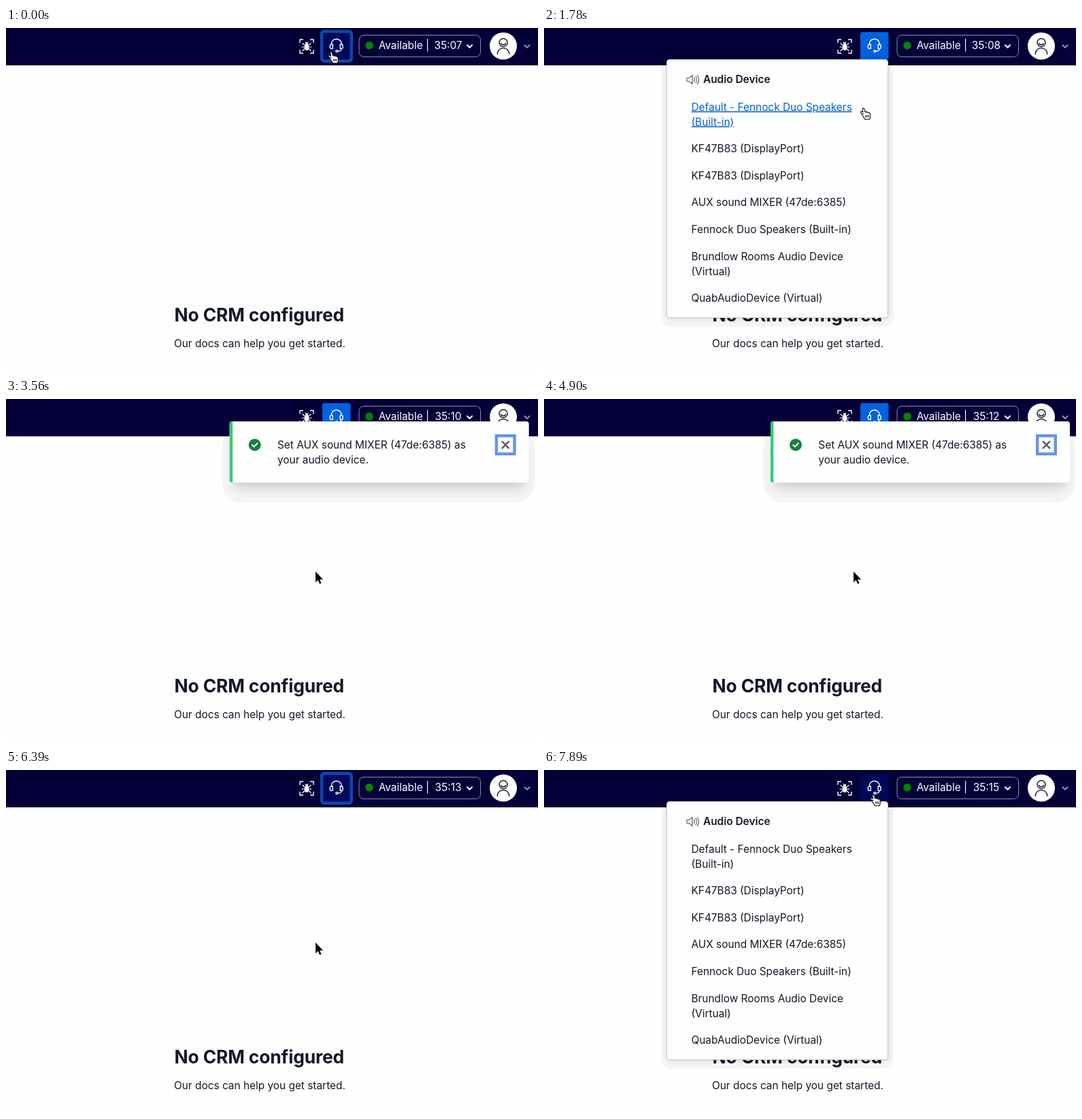
Recreate the animation shown at these times as an HTML page. Size 782x505 px, loop 8000 ms.

```html
<!DOCTYPE html>
<html lang="en">
<head>
<meta charset="utf-8">
<title>Audio device menu</title>
<style>
  html, body { margin: 0; width: 100%; height: 100%; overflow: hidden; background: #fefefe; }
  svg { display: block; width: 100%; height: 100%; }
  text { font: 15.4px Inter, "Liberation Sans", sans-serif; fill: #111827; white-space: pre; }
  .bold { font-weight: 600; }
  .title { font-size: 26.4px; font-weight: 700; letter-spacing: -.005em; }
  .light text { fill: #fff; }
  .line { fill: none; stroke-linecap: round; stroke-linejoin: round; }
  .hover text { fill: #0062e0; text-decoration: underline; }
</style>
</head>
<body>
<svg viewBox="0 0 782 505">
  <rect width="782" height="505" fill="#fefefe"/>
  <text class="title" x="247.5" y="431.5">No CRM configured</text>
  <text x="247" y="469.5">Our docs can help you get started.</text>

  <g class="light">
    <rect width="782" height="55" fill="#040038"/>

    <!-- bug report -->
    <g class="line" stroke="#fff" stroke-width="1.4">
      <path d="M432 22v-5h5M447 17h5v5M452 32v5h-5M437 37h-5v-5" stroke-linecap="butt"/>
      <path d="M439 25l-3-2.5M445 25l3-2.5M438.5 28H435M445.5 28h3.5M439 30.5l-3 3M445 30.5l3 3" stroke-width="1.2"/>
      <path d="M440 20.5l1 1.5M444 20.5l-1 1.5" stroke-width="1"/>
    </g>
    <ellipse cx="442" cy="28.3" rx="3.3" ry="4.8" fill="#fff"/>
    <circle cx="442" cy="23" r="2" fill="#fff"/>

    <!-- headset button -->
    <rect id="button" x="465" y="6" width="41.5" height="41" rx="3"/>
    <rect id="ring" x="464" y="5" width="43.8" height="43.8" rx="4" fill="none" stroke="#0a49b0" stroke-width="4.4"/>
    <g class="line" stroke="#fff" stroke-width="1.4">
      <path d="M478.3 24v-1a7.4 6.8 0 0 1 14.8 0v1"/>
      <path d="M480.2 24h-1.7a2.2 2.2 0 0 0-2.2 2.2v2a2.2 2.2 0 0 0 2.2 2.2h1.7z"/>
      <path d="M491.2 24h1.7a2.2 2.2 0 0 1 2.2 2.2v2a2.2 2.2 0 0 1-2.2 2.2h-1.7z"/>
      <path d="M493 30.5a4 4 0 0 1-4 3.6h-1.3"/>
      <circle cx="486.3" cy="34.1" r="1.5"/>
    </g>

    <!-- status -->
    <rect x="519" y="10.5" width="178.5" height="32" rx="7" fill="none" stroke="#8f8da8"/>
    <circle cx="534" cy="25.7" r="5.8" fill="#008500"/>
    <text x="547.7" y="31">Available |</text>
    <text id="clock" x="650" y="31" text-anchor="middle"></text>
    <path class="line" d="M678 25.3l3.5 3.5 3.5-3.5" stroke="#fff" stroke-width="2.2"/>

    <!-- account -->
    <circle cx="731" cy="26.5" r="20" fill="#fff"/>
    <g class="line" stroke="#222230" stroke-width="1.5">
      <circle cx="731" cy="21.5" r="6"/>
      <path d="M727.5 22.5a3.6 3 0 0 0 7 0M722.3 38.3a8.7 8.9 0 0 1 17.4 0"/>
    </g>
    <path class="line" d="M762.5 25.3l3.5 3.5 3.5-3.5" stroke="#8a89a5" stroke-width="2.2"/>
  </g>

  <g id="menu">
    <rect x="172.5" y="40" width="341.5" height="399.5" rx="14" opacity=".04"/>
    <rect x="180" y="48" width="326" height="380" rx="5" opacity=".12" style="filter:blur(3px)"/>
    <rect x="180.5" y="46.5" width="325" height="380" rx="4" fill="#fefefe" stroke="#c5c8d4"/>
    <g class="line" stroke="#5d6271" stroke-width="1.2">
      <path d="M210 73.5h3.5l4.5-4v13l-4.5-4h-3.5z"/>
      <path d="M220.5 73.5a4 4 0 0 1 0 5M223 71.5a7 7 0 0 1 0 9M225.3 69.6a10 10 0 0 1 0 12.8"/>
    </g>
    <text class="bold" x="234" y="81">Audio Device</text>
    <g id="items"></g>
  </g>

  <g id="toast">
    <rect x="322" y="40" width="459" height="113" rx="30" opacity=".03"/>
    <rect x="338.5" y="58" width="429" height="76" rx="4" opacity=".11" style="filter:blur(10px)"/>
    <rect x="338.5" y="49.5" width="429" height="79" rx="4" opacity=".05" style="filter:blur(5.5px)"/>
    <rect x="333" y="33" width="440" height="90" rx="4" fill="#fefefe"/>
    <path d="M337.4 33v90h-.9a3.5 3.5 0 0 1-3.5-3.5v-83a3.5 3.5 0 0 1 3.5-3.5z" fill="#38cb74"/>
    <circle cx="370" cy="67.5" r="9" fill="#15803d"/>
    <path class="line" d="M366.3 67.8l2.6 2.6 4.9-5.2" stroke="#fff" stroke-width="2"/>
    <text id="message" x="403.3" y="73"></text>
    <text x="403.3" y="95">your audio device.</text>
    <rect x="725.2" y="54.2" width="26.6" height="26.6" fill="#fefefe" stroke="#6694ea" stroke-width="4.4"/>
    <path class="line" d="M733.7 62.7l9.6 9.6m0-9.6l-9.6 9.6" stroke="#565c6d" stroke-width="2.4"/>
  </g>

  <g id="pointer">
    <path id="hand" d="M.4 9.4L-3.3 7.4C-5 6.3-3.7 4.4-2 5.2L-.3 6.3-1.3 2C-1.6 .1 1-.3 1.5 1.5L2.5 6C3.2 5 4.8 5.2 5 6.5 5.8 5.7 7.2 6 7.4 7.2 8.5 6.5 9.8 7.2 10 8.5L10.4 12.3C10.4 14 9.5 14.7 9.3 16.7H2.2C1.9 14.3-.9 12.5-2.6 9.3M3.3 10.5l.4 3.5M5.5 10.3l.3 3.6M7.7 10.2l.2 3.6" fill="#fff" stroke="#111" stroke-width="1.1" stroke-linejoin="round"/>
    <path id="arrow" d="M0-1V15L3.6 11.6 6 17.2 8.5 16.1 6.1 10.7H11Z" fill="#000" stroke="#fff" stroke-width="1.2" stroke-linejoin="round" paint-order="stroke"/>
  </g>
</svg>
<script>
const LOOP = 8000, STEP = 148.8, LEAD = 20;
const DEVICE = 'AUX sound MIXER (47de:6385)';
const DEVICES = [
  ['Default - Fennock Duo Speakers', '(Built-in)'],
  ['KF47B83 (DisplayPort)'],
  ['KF47B83 (DisplayPort)'],
  [DEVICE],
  ['Fennock Duo Speakers (Built-in)'],
  ['Brundlow Rooms Audio Device', '(Virtual)'],
  ['QuabAudioDevice (Virtual)']
];
const LINE = 22, PAD = 17.6;

const $ = id => document.getElementById(id);
const el = (name, attrs, parent) => {
  const node = document.createElementNS('http://www.w3.org/2000/svg', name);
  for (const key in attrs) node.setAttribute(key, attrs[key]);
  return parent.appendChild(node);
};
const show = (id, on) => $(id).setAttribute('visibility', on ? 'visible' : 'hidden');
const mix = (a, b, k) => a + (b - a) * k;
const clamp = k => Math.min(1, Math.max(0, k));
const smooth = k => k * k * (3 - 2 * k);
const easeOut = k => 1 - (1 - k) ** 3;

let rowY = 96;
const items = DEVICES.map(lines => {
  const group = el('g', {}, $('items'));
  lines.forEach((line, i) => {
    el('text', { x: 216.5, y: rowY + 25.6 + i * LINE }, group).textContent = line;
  });
  const from = rowY;
  rowY += lines.length * LINE + PAD;
  return { group, from, to: rowY };
});
$('message').textContent = `Set ${DEVICE} as`;

function pointerAt(n) {
  const down = smooth(clamp((n - 8) / 9.6));
  const up = smooth(clamp((n - 43) / 5.5));
  return {
    x: mix(mix(478, 455, down), 484, up),
    y: mix(mix(35, 255, down), 36, up)
  };
}

function menuAlpha(n) {
  if (n === 4 || n === 51) return 0.5;
  if (n === 21) return 0.4;
  return (n > 4 && n < 21) || n > 51 ? 1 : 0;
}

// Slides in from the right and bounces to rest.
function toastShift(n) {
  const k = clamp((n * 148.4 - 2975) / 700);
  const stops = [[0, 3300], [0.6, -27.5], [0.75, 11], [0.9, -5.5], [1, 0]];
  const i = Math.max(1, stops.findIndex(s => k <= s[0]));
  const [k0, x0] = stops[i - 1], [k1, x1] = stops[i];
  return mix(x0, x1, easeOut((k - k0) / (k1 - k0)));
}

function render(t) {
  const n = Math.floor((t + LEAD) / STEP);
  const seconds = 7 + Math.floor((n + 1) / 6.65);
  $('clock').textContent = '35:' + String(seconds).padStart(2, '0');

  const { x, y } = pointerAt(n);
  const alpha = menuAlpha(n);
  const onButton = y < 47;
  $('menu').setAttribute('opacity', alpha);
  let onItem = false;
  for (const { group, from, to } of items) {
    const hit = alpha > 0 && y >= from && y < to;
    group.setAttribute('class', hit ? 'hover' : '');
    onItem = onItem || hit;
  }

  const focused = n < 4 || (n >= 42 && n < 51);
  show('ring', focused);
  $('button').setAttribute('fill', focused || onButton ? '#00085a' : '#0062e0');

  // The toast leaves by shrinking and fading.
  const leave = clamp((n - 40) / 3);
  const scale = 1 - 0.22 * leave;
  show('toast', n >= 21 && leave < 1);
  $('toast').setAttribute('opacity', 1 - leave);
  $('toast').setAttribute('transform',
    `translate(${553 + toastShift(n)} 78) scale(${scale}) translate(-553 -78)`);

  $('pointer').setAttribute('transform', `translate(${x} ${y})`);
  show('hand', onButton || onItem);
  show('arrow', !onButton && !onItem);
}

const start = performance.now();
function frame() {
  render((performance.now() - start) % LOOP);
  requestAnimationFrame(frame);
}
frame();
</script>
</body>
</html>
```
